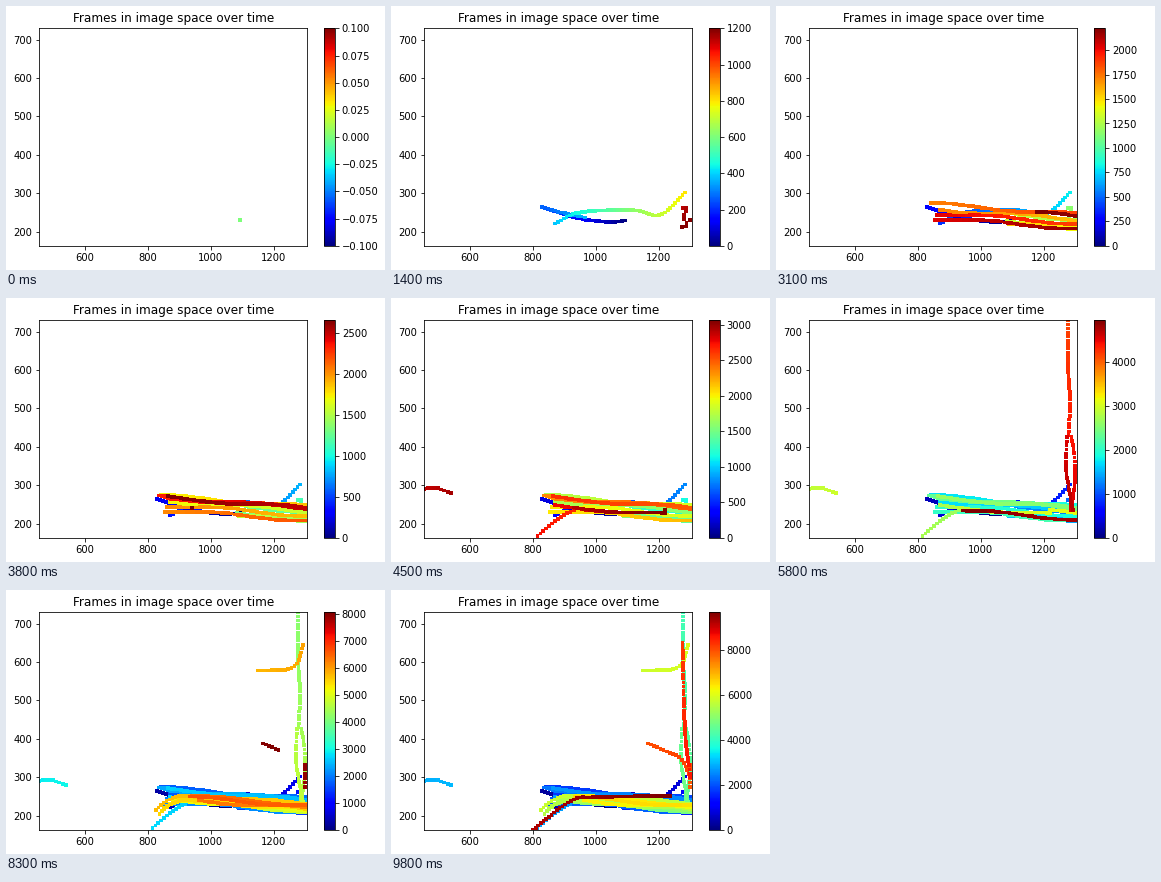
Animation, 379 px wide and 264 px high, one loop 9900 ms. Source, as a matplotlib script:

```python
import numpy as np
import matplotlib.pyplot as plt
from matplotlib.animation import FuncAnimation

W, H, DPI = 379, 264, 72
FRAMES, INTERVAL = 99, 100
TIME_PER_FRAME = 60
SPACING = 10            # distance between neighbouring dots

rng = np.random.default_rng(5)


def glide(*nodes):
    """Catmull-Rom curve through a few key points."""
    p = np.array(nodes, float)
    p = np.vstack([2 * p[0] - p[1], p, 2 * p[-1] - p[-2]])
    u = np.linspace(0, 1, 30)[:, None]
    return np.vstack([
        0.5 * (2 * b + (c - a) * u
               + (2 * a - 5 * b + 4 * c - d) * u ** 2
               + (3 * b - a - 3 * c + d) * u ** 3)
        for a, b, c, d in zip(p, p[1:], p[2:], p[3:])])


def lap(x0, x1, lift=0, phase=0, droop=0):
    """One pass along the gently falling, slightly wavy band."""
    x = np.linspace(x0, x1, 100)
    y = 243 - 0.06 * (x - 950) + lift + 4 * np.sin(x / 60 + phase)
    y -= droop * np.maximum(0, 930 - x) ** 2
    return np.column_stack([x, y])


def resample(curve):
    """Evenly spaced dots along a curve, with their share of its length."""
    dist = np.r_[0, np.cumsum(np.hypot(*np.diff(curve, axis=0).T))]
    share = np.linspace(0, 1, max(2, round(dist[-1] / SPACING)))
    dots = [np.interp(share * dist[-1], dist, curve[:, k]) for k in (0, 1)]
    return np.round(np.column_stack(dots)), share


points, times, reveal = [], [], []
clock = 0


def add(start, frames, curve):
    """Queue a track: first recorded time, frames it takes, its curve."""
    global clock
    dots, share = resample(curve)
    points.extend(dots)
    times.extend(start + TIME_PER_FRAME * frames * share)
    reveal.extend(clock + frames * share)
    clock += frames


def add_laps(start, frames, count, left, low, high, droop=0):
    """Queue laps that go back and forth at random heights in the band."""
    step = frames / count
    for k in range(count):
        ends = [1298, left + rng.uniform(-10, 40)]
        if k % 2:
            ends.reverse()
        curve = lap(*ends, rng.uniform(low, high), rng.uniform(0, 6), droop)
        add(start + k * step * TIME_PER_FRAME, step, curve)


# Opening tracks and a short burst at the right edge
add(0, 4.5, glide((1093, 229), (1040, 225), (940, 236), (828, 264)))
add(270, 1.5, glide((850, 260), (905, 247), (965, 237)))
add(380, 7, glide((870, 221), (950, 250), (1120, 256), (1205, 244), (1283, 302)))
add(1140, 1, glide((1275, 262), (1290, 260), (1278, 240), (1290, 216), (1274, 212)))

# First laps, a dive out of the band and a visit at the far left
add_laps(1200, 6, 3, 1080, -14, 16)
add_laps(1565, 18, 7, 830, -16, 24)
add(2650, 1.5, glide((940, 240), (880, 212), (815, 168)))
add(2750, 1.5, lap(870, 1000, -4))
add(2870, 1.5, glide((455, 290), (490, 293), (540, 280)))
add(2906, 2.5, lap(930, 1220, -3))
add(3060, 1, lap(1220, 1300, 5))

# Column at the right edge, then the second group of laps
add(4150, 4, glide((1277, 729), (1276, 620), (1283, 520), (1278, 430)))
add(4400, 2.5, glide((1288, 425), (1297, 370), (1297, 300), (1285, 235)))
add(4550, 2.5, glide((1274, 425), (1270, 350), (1280, 290), (1292, 235)))
add_laps(4770, 5, 2, 930, -10, 10)
add_laps(5090, 10.5, 5, 835, -12, 10, droop=0.0045)

# Upper track, last laps and the final descents
add(5760, 3, glide((1150, 578), (1240, 581), (1275, 598), (1293, 645)))
add_laps(6200, 7, 3, 930, -10, 8)
add(7860, 1.5, glide((1298, 275), (1300, 332)))
add(7990, 3, glide((1165, 388), (1205, 374), (1270, 348), (1300, 300)))
add(8200, 6, glide((1275, 650), (1279, 500), (1285, 400), (1300, 300)))
add(9240, 7, glide((800, 163), (920, 238), (1000, 248), (1235, 252)))

points, times, reveal = map(np.array, (points, times, reveal))


def add_axes(x, y, w, h):
    return fig.add_axes([x / W, y / H, w / W, h / H])


# The small margin keeps the canvas from rounding down a pixel.
fig = plt.figure(figsize=((W + 0.01) / DPI, (H + 0.01) / DPI), dpi=DPI,
                 facecolor="white")
ax = add_axes(33.3, 24.2, 267.84, 217.44)
cax = add_axes(317.88, 24.2, 10.87, 217.44)
ax.set_xlim(455.5, 1305.8)
ax.set_ylim(163, 729.5)
ax.set_title("Frames in image space over time")

dots = ax.scatter(points[:1, 0], points[:1, 1], c=times[:1], s=14, marker="s",
                  linewidths=0, cmap="jet", vmin=-0.1, vmax=0.1)
fig.colorbar(dots, cax=cax)


def update(i):
    shown = reveal <= i + 1e-6
    dots.set_offsets(points[shown])
    dots.set_array(times[shown])
    latest = times[shown].max()
    dots.set_clim(0 if latest else -0.1, latest or 0.1)
    return dots,


anim = FuncAnimation(fig, update, frames=FRAMES, interval=INTERVAL,
                     repeat=True, repeat_delay=0, blit=False)
plt.show()
```
